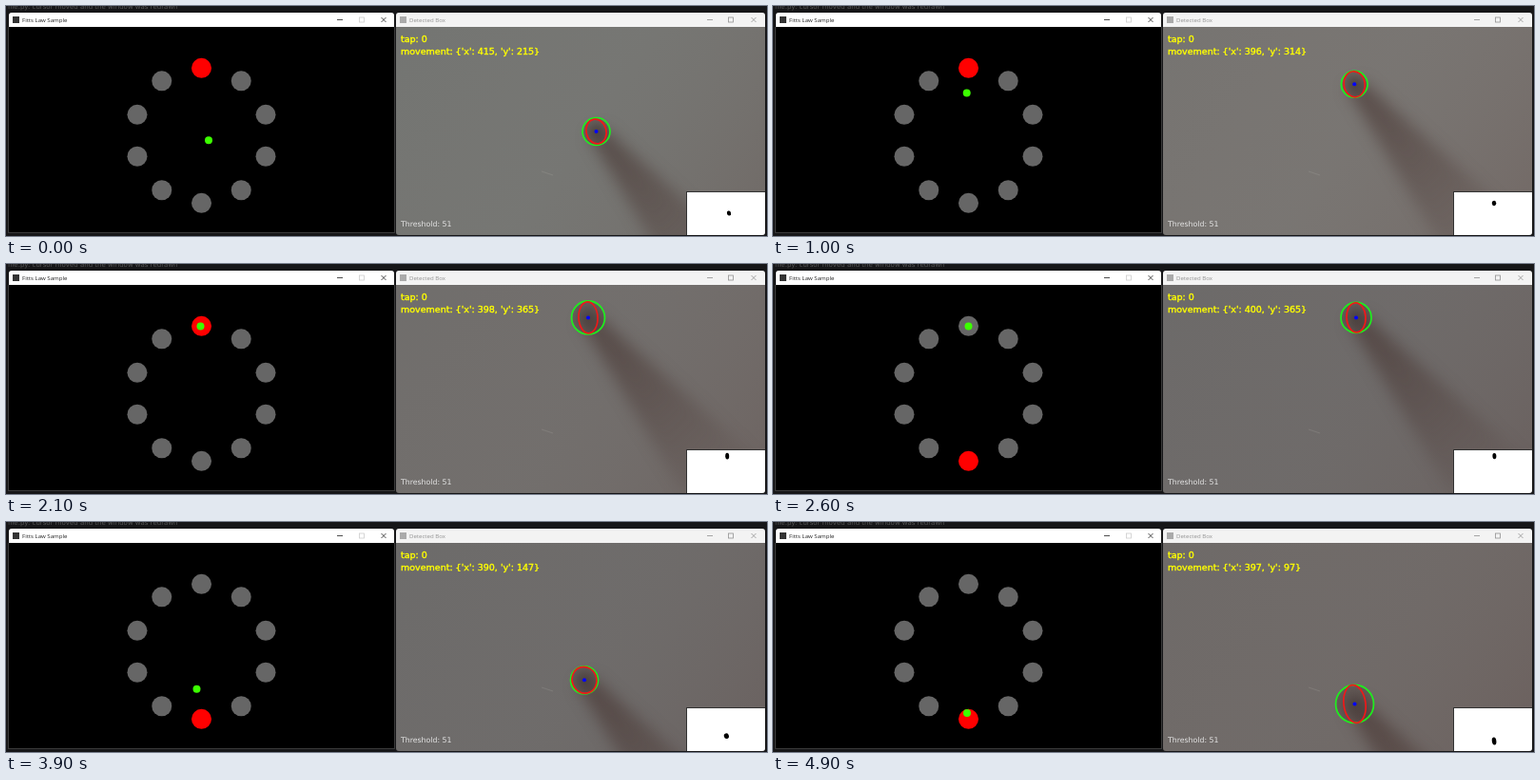
An HTML page with a canvas for the animation above (5000 ms loop, 800 by 242 pixels).

```html
<!DOCTYPE html>
<html lang="en">
<head>
<meta charset="utf-8">
<title>Finger pointing test</title>
<style>
html, body { margin: 0; width: 100%; height: 100%; overflow: hidden; background: #161618; }
canvas { display: block; }
</style>
</head>
<body>
<canvas id="stage" width="800" height="242"></canvas>
<script>
const ctx = document.getElementById('stage').getContext('2d');
const LOOP = 5000, STEP = 100, SWITCH = 2600;
const UI = '"Open Sans", sans-serif', HUD = '"DejaVu Sans", sans-serif';

// time, x, y, ring radius, ellipse rx, ry, tilt, background r, g, b
const KEYS = [
  [0,    415, 215, 14.5, 10.5, 13,   -.25, 118, 119, 116],
  [500,  400, 261, 14.5, 12,   14,   -.3,  130, 128, 125],
  [1500, 395, 352, 13.2, 10,   13,   0,    111, 107, 105],
  [2100, 398, 365, 17.5, 10,   16.5, -.05, 114, 111, 109],
  [2600, 400, 365, 16,   10,   15.5, -.05, 110, 107, 106],
  [3200, 414, 279, 12.5, 10.5, 12,   -.4,  107, 105, 104],
  [3900, 390, 147, 14.5, 12.8, 14,   -.3,  110, 108, 107],
  [4900, 397, 97,  20,   11.5, 20,   -.13, 112, 107, 105]
];

const slope = (i, k) => (KEYS[i + 1][k] - KEYS[i][k]) / (KEYS[i + 1][0] - KEYS[i][0]);

// Monotone tangent at key i
function tangent(i, k) {
  if (i === 0) return slope(0, k);
  if (i === KEYS.length - 1) return slope(i - 1, k);
  const a = slope(i - 1, k), b = slope(i, k);
  return a * b > 0 ? 2 * a * b / (a + b) : 0;
}

function sample(t, k) {
  let i = 0;
  while (i < KEYS.length - 2 && t > KEYS[i + 1][0]) i++;
  const h = KEYS[i + 1][0] - KEYS[i][0], u = (t - KEYS[i][0]) / h, v = 1 - u;
  return KEYS[i][k] * (1 + 2 * u) * v * v + KEYS[i + 1][k] * (3 - 2 * u) * u * u
    + h * u * v * (tangent(i, k) * v - tangent(i + 1, k) * u);
}

function rect(x, y, w, h, color) {
  ctx.fillStyle = color;
  ctx.fillRect(x, y, w, h);
}

function oval(x, y, rx, ry, tilt) {
  ctx.beginPath();
  ctx.ellipse(x, y, rx, ry, tilt, 0, 7);
}

function disc(x, y, r, color) {
  oval(x, y, r, r, 0);
  ctx.fillStyle = color;
  ctx.fill();
}

function ring(x, y, rx, ry, tilt, color) {
  oval(x, y, rx, ry, tilt);
  ctx.strokeStyle = color;
  ctx.lineWidth = 1.7;
  ctx.stroke();
}

function line(color, width, ...p) {
  ctx.beginPath();
  for (let i = 0; i < p.length; i += 2) ctx.lineTo(p[i], p[i + 1]);
  ctx.strokeStyle = color;
  ctx.lineWidth = width;
  ctx.stroke();
}

function label(text, x, y, size, font, color, weight = 0) {
  ctx.font = size + 'px ' + font;
  ctx.fillStyle = ctx.strokeStyle = color;
  ctx.fillText(text, x, y);
  if (weight) {
    ctx.lineWidth = weight;
    ctx.strokeText(text, x, y);
  }
}

function titleBar(x, w, title, bar, ink, icon, maxInk, buttons) {
  ctx.beginPath();
  ctx.roundRect(x, 7, w, 17, [3, 3, 0, 0]);
  ctx.fillStyle = bar;
  ctx.fill();
  rect(x + 4, 11, 7, 7, icon);
  label(title, x + 14, 17, 6.1, UI, ink);
  const [min, max, close] = buttons;
  line(ink, .8, min - 3, 14.5, min + 3, 14.5);
  ctx.strokeStyle = maxInk;
  ctx.strokeRect(max - 2.5, 12, 5, 5);
  line(ink, .8, close - 2.5, 12, close + 2.5, 17);
  line(ink, .8, close + 2.5, 12, close - 2.5, 17);
}

function drawTask(x, y, t) {
  rect(2, 22, 407, 217, '#3a3a3a');
  titleBar(3, 405, 'Fitts Law Sample', '#fff', '#222', '#333', '#ccc', [351, 374, 397]);
  rect(3, 22, 405, 216, '#000');
  const active = t < SWITCH ? 0 : 5;
  for (let i = 0; i < 10; i++) {
    const a = i * Math.PI / 5;
    disc(205.5 + 71 * Math.sin(a), 136.3 - 71 * Math.cos(a), 10.5, i === active ? '#f00' : '#666');
  }
  disc(205.5 + (x - 400) / 2, 141.3 - (y - 215) * .506, 4, '#3cff00');
}

function drawShadow(x, y) {
  const fade = ctx.createLinearGradient(x, y, x + 140, y + 150);
  fade.addColorStop(0, 'rgba(62,42,38,.55)');
  fade.addColorStop(.5, 'rgba(66,46,42,.36)');
  fade.addColorStop(1, 'rgba(70,50,46,.12)');
  ctx.filter = 'blur(8px)';
  ctx.beginPath();
  ctx.moveTo(x - 8, y + 4);
  ctx.lineTo(x + 9, y - 3);
  ctx.lineTo(x + 185, y + 155);
  ctx.lineTo(x + 100, y + 185);
  ctx.fillStyle = fade;
  ctx.fill();
  ctx.filter = 'none';
}

function drawCamera(x, y, t) {
  const fx = 613 + (x - 400) / 2, fy = 132 - (y - 215) * .504;
  const [r, rx, ry, tilt, ...tone] = [3, 4, 5, 6, 7, 8, 9].map(k => sample(t, k));

  titleBar(410, 388, 'Detected Box', '#f3f3f3', '#929292', '#aaa', '#929292', [740, 762, 786]);
  ctx.save();
  ctx.beginPath();
  ctx.roundRect(410, 22, 388, 219, [0, 0, 3, 3]);
  ctx.clip();
  rect(410, 22, 388, 220, `rgb(${tone.map(Math.round)})`);
  const tint = ctx.createLinearGradient(430, 22, 760, 242);
  tint.addColorStop(0, 'rgba(95,100,98,.1)');
  tint.addColorStop(.5, 'rgba(120,105,100,.04)');
  tint.addColorStop(1, 'rgba(95,65,60,.2)');
  rect(410, 22, 388, 220, tint);
  line('rgba(190,180,175,.18)', 1.2, 563, 174, 575, 178);
  drawShadow(fx, fy);

  const tip = ctx.createRadialGradient(fx, fy, 2, fx, fy, r);
  tip.addColorStop(0, 'rgba(62,50,48,.6)');
  tip.addColorStop(1, 'rgba(70,52,48,.28)');
  disc(fx, fy, r - 1, tip);
  ring(fx, fy, r, r, 0, '#1cf01c');
  ring(fx, fy, rx, ry, tilt, '#f01818');
  disc(fx, fy, 2, '#00f');

  label('tap: 0', 415, 38, 9.5, HUD, '#ff0', .4);
  label(`movement: {'x': ${Math.round(x)}, 'y': ${Math.round(y)}}`, 415, 51, 9.5, HUD, '#ff0', .4);
  label('Threshold: 51', 415, 232, 7.8, HUD, '#e4e4e4');

  rect(715, 195, 83, 46, '#333');
  rect(716, 196, 82, 45, '#fff');
  oval(758.4 + (x - 400) * .105, 218 - (y - 215) * .106, rx * .2, ry * .2, tilt);
  ctx.fillStyle = '#000';
  ctx.fill();
  ctx.restore();
}

function draw(now) {
  const t = Math.floor(now % LOOP / STEP) * STEP;
  const x = sample(t, 1), y = sample(t, 2);
  rect(0, 0, 800, 242, '#161618');
  label('file.py: cursor moved and the window was redrawn', 2, 3, 7, HUD, '#555');
  drawTask(x, y, t);
  drawCamera(x, y, t);
}

const start = performance.now();
function tick() {
  draw(performance.now() - start);
  requestAnimationFrame(tick);
}
tick();
</script>
</body>
</html>
```
